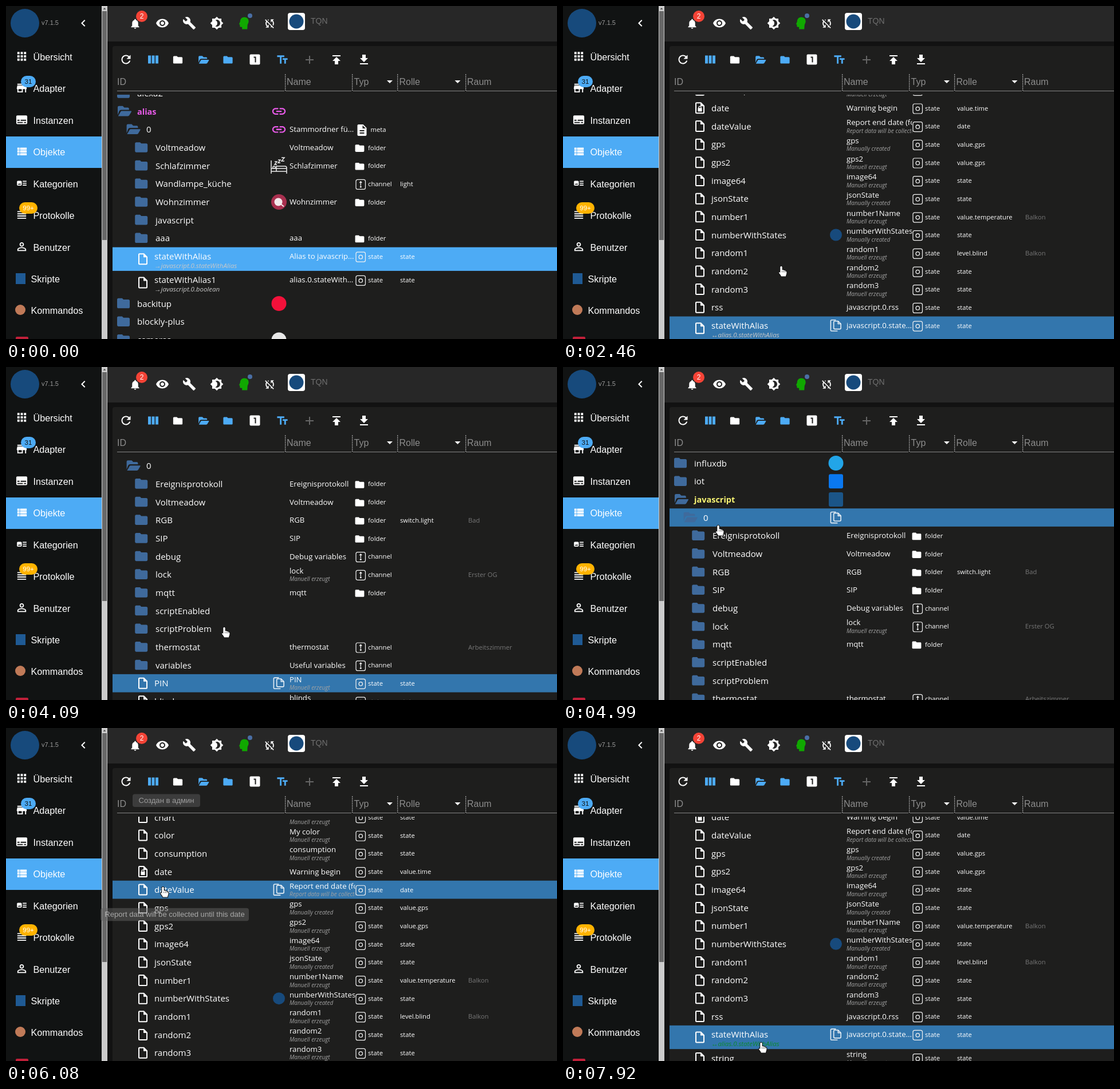
Recreate the animation shown at these times as an HTML page with a canvas. Size 962x582 px, loop 8000 ms.

```html
<!DOCTYPE html>
<html lang="de">
<head>
<meta charset="utf-8">
<style>
html, body { margin: 0; width: 100%; height: 100%; overflow: hidden; background: #121212; }
canvas { display: block; width: 962px; height: 582px; }
</style>
</head>
<body>
<canvas id="stage" width="962" height="582"></canvas>
<script>
const ctx = document.getElementById('stage').getContext('2d');
const LOOP = 8000, ROW = 31.67, TALL = 41.3, TOP = 155;
const UI = '"Liberation Sans", Arial, sans-serif';
const LIST = '"Open Sans", "Noto Sans", sans-serif';
const BLUE = '#4dabf5', HOVER = '#3376ad', FOLDER = '#3f6a9c', NAVY = '#174a7c', PANEL = '#1e1e1d';

const P = {};
const shapes = {
  apps: 'M4 4h4v4H4zM10 4h4v4h-4zM16 4h4v4h-4zM4 10h4v4H4zM10 10h4v4h-4zM16 10h4v4h-4zM4 16h4v4H4zM10 16h4v4h-4zM16 16h4v4h-4z',
  store: 'M20 4H4v2h16V4zm1 10v-2l-1-5H4l-1 5v2h1v6h10v-6h4v6h2v-6h1zm-9 4H6v-4h6v4z',
  subs: 'M20 4H4c-1.1 0-2 .9-2 2v12c0 1.1.9 2 2 2h16c1.1 0 2-.9 2-2V6c0-1.1-.9-2-2-2zM4 12h4v2H4v-2zm10 6H4v-2h10v2zm6 0h-4v-2h4v2zm0-4H10v-2h10v2z',
  list: 'M4 14h4v-4H4v4zm0 5h4v-4H4v4zM4 9h4V5H4v4zm5 5h12v-4H9v4zm0 5h12v-4H9v4zM9 5v4h12V5H9z',
  art: 'M22 13h-8v-2h8v2zm0-6h-8v2h8V7zm-8 10h8v-2h-8v2zm-2-8v6c0 1.1-.9 2-2 2H4c-1.1 0-2-.9-2-2V9c0-1.1.9-2 2-2h6c1.1 0 2 .9 2 2zm-1.5 6l-2.25-3-1.75 2.26-1.25-1.51L3.5 15h7z',
  lines: 'M4 15h16v-2H4v2zm0 4h16v-2H4v2zm0-8h16V9H4v2zm0-6v2h16V5H4z',
  person: 'M12 5.9a2.1 2.1 0 1 1 0 4.2 2.1 2.1 0 1 1 0-4.2m0 9c2.97 0 6.1 1.46 6.1 2.1v1.1H5.9V17c0-.64 3.13-2.1 6.1-2.1M12 4C9.79 4 8 5.79 8 8s1.79 4 4 4 4-1.79 4-4-1.79-4-4-4zm0 9c-2.67 0-8 1.34-8 4v3h16v-3c0-2.66-5.33-4-8-4z',
  bell: 'M12 22c1.1 0 2-.9 2-2h-4c0 1.1.89 2 2 2zm6-6v-5c0-3.07-1.64-5.64-4.5-6.32V4c0-.83-.67-1.5-1.5-1.5s-1.5.67-1.5 1.5v.68C7.63 5.36 6 7.92 6 11v5l-2 2v1h16v-1l-2-2z',
  eye: 'M12 4.5C7 4.5 2.73 7.61 1 12c1.73 4.39 6 7.5 11 7.5s9.27-3.11 11-7.5c-1.73-4.39-6-7.5-11-7.5zM12 17c-2.76 0-5-2.24-5-5s2.24-5 5-5 5 2.24 5 5-2.24 5-5 5zm0-8c-1.66 0-3 1.34-3 3s1.34 3 3 3 3-1.34 3-3-1.34-3-3-3z',
  wrench: 'M22.7 19l-9.1-9.1c.9-2.3.4-5-1.5-6.9-2-2-5-2.4-7.4-1.3L9 6 6 9 1.6 4.7C.4 7.1.9 10.1 2.9 12.1c1.9 1.9 4.6 2.4 6.9 1.5l9.1 9.1c.4.4 1 .4 1.4 0l2.3-2.3c.5-.4.5-1.1.1-1.4z',
  theme: 'M20 8.69V4h-4.69L12 .69 8.69 4H4v4.69L.69 12 4 15.31V20h4.69L12 23.31 15.31 20H20v-4.69L23.31 12 20 8.69zM12 18c-.89 0-1.74-.2-2.5-.55C11.56 16.5 13 14.42 13 12s-1.44-4.5-3.5-5.45C10.26 6.2 11.11 6 12 6c3.31 0 6 2.69 6 6s-2.69 6-6 6z',
  head: 'M13 1c5 0 8 3 8 7.500 0 3-1.500 4.500-2 6.500L18.500 23H9v-4H6.500Q4.500 19 5 16.500L5.200 14.500 3.500 14 5.500 9C5.500 4 9 1 13 1z',
  nosync: 'M10 6.35V4.26c-.8.21-1.55.54-2.23.96l1.46 1.46c.25-.12.5-.24.77-.33zm-7.14-.94l2.36 2.36C4.45 8.99 4 10.44 4 12c0 2.21.91 4.2 2.36 5.64L4 20h6v-6l-2.24 2.24C6.68 15.15 6 13.66 6 12c0-1 .25-1.94.68-2.77l8.08 8.08c-.25.13-.5.25-.77.34v2.09c.8-.21 1.55-.54 2.23-.96l2.36 2.36 1.27-1.27L4.14 4.14 2.86 5.41zM20 4h-6v6l2.24-2.24C17.32 8.85 18 10.34 18 12c0 1-.25 1.94-.68 2.77l1.46 1.46C19.55 15.01 20 13.56 20 12c0-2.21-.91-4.2-2.36-5.64L20 4z',
  refresh: 'M17.65 6.35C16.2 4.9 14.21 4 12 4c-4.42 0-7.99 3.58-7.99 8s3.57 8 7.99 8c3.73 0 6.84-2.55 7.73-6h-2.08c-.82 2.33-3.04 4-5.65 4-3.31 0-6-2.69-6-6s2.69-6 6-6c1.66 0 3.14.69 4.22 1.78L13 11h7V4l-2.35 2.35z',
  cols: 'M3 5h5v14H3zM9.500 5h5v14h-5zM16 5h5v14h-5z',
  folder: 'M10 4H4c-1.1 0-1.99.9-1.99 2L2 18c0 1.1.9 2 2 2h16c1.1 0 2-.9 2-2V8c0-1.1-.9-2-2-2h-8l-2-2z',
  open: 'M2 18V6q0-2 2-2h6l2.500 2.500H18q2 0 2 2V10H7.500q-2 0-3 1.800zM2.700 20l4-7q.6-1 2-1H23q1.400 0 .7 1.300l-3.400 5.700q-.6 1-2 1z',
  one: 'M19 3H5c-1.1 0-2 .9-2 2v14c0 1.1.9 2 2 2h14c1.1 0 2-.9 2-2V5c0-1.1-.9-2-2-2zm-5 14h-2V9h-2V7h4v10z',
  text: 'M2.5 4v3h5v12h3V7h5V4h-13zm19 5h-9v3h3v7h3v-7h3V9z',
  add: 'M19 13h-6v6h-2v-6H5v-2h6V5h2v6h6v2z',
  up: 'M5 4v2h14V4H5zm0 10h4v6h6v-6h4l-7-7-7 7z',
  down: 'M19 9h-4V3H9v6H5l7 7 7-7zM5 18v2h14v-2H5z',
  file: 'M14 2H6c-1.1 0-2 .9-2 2v16c0 1.1.89 2 1.99 2H18c1.1 0 2-.9 2-2V8l-6-6zM6 20V4h7v5h5v11H6z',
  meta: 'M14 2H6c-1.1 0-1.99.9-1.99 2L4 20c0 1.1.89 2 1.99 2H18c1.1 0 2-.9 2-2V8l-6-6zm2 16H8v-2h8v2zm0-4H8v-2h8v2zm-3-5V3.5L18.5 9H13z',
  link: 'M3.9 12c0-1.71 1.39-3.1 3.1-3.1h4V7H7c-2.76 0-5 2.24-5 5s2.24 5 5 5h4v-1.900H7c-1.71 0-3.100-1.390-3.100-3.100zM8 13h8v-2H8v2zm9-6h-4v1.900h4c1.710 0 3.100 1.390 3.100 3.100s-1.390 3.100-3.100 3.100h-4V17h4c2.760 0 5-2.240 5-5s-2.240-5-5-5z',
  chevron: 'M15.41 7.41L14 6l-6 6 6 6 1.41-1.41L10.83 12z',
  drop: 'M7 10l5 5 5-5z',
  hand: 'M-1.700 1Q0-1.500 1.700 1V6.500Q4 5.500 5 7.300Q7.300 6.700 8 8.500Q9.500 8.500 9.500 11L9 14Q8 15.500 8 17.500H0Q-1 15-4 11.500Q-4.500 9.500-1.700 10.700Z',
  copy: 'M2.500 17V4.500q0-2 2-2H12M8 6.500q0-2 2-2h6l5 5V17q0 2-2 2h-9q-2 0-2-2zM16 4.500v5h5M2.500 17v4q0 1.500 1.500 1.500h11',
  bed: 'M0 4v23M0 23h27v4M27 23v-6q0-3-3-3H9v9M0 18h27M7 16a2 2 0 1 1-4 0a2 2 0 1 1 4 0M6 6h4l-4 5h4M12 3h4l-4 5h4M18-1h5l-5 6h5'
};
for (const k in shapes) P[k] = new Path2D(shapes[k]);

// name | kind | title | subtitle | type | role | room | icon | link
const parse = s => {
  let y = 0;
  return s.trim().split('\n').map(line => {
    const [name, kind, title, sub, type, role, room, icon, link] = line.split('|');
    const row = { name, kind, title, sub, type, role, room, icon, link, y, h: link ? TALL : ROW };
    y += row.h;
    return row;
  });
};
const aliasRows = parse(`
alexa2|a
alias|A|||||| link
0|B|Stammordner fü...||meta|||link
Voltmeadow|c|Voltmeadow||folder
Schlafzimmer|c|Schlafzimmer||folder|||bed
Wandlampe_küche|c|||channel|light
Wohnzimmer|c|Wohnzimmer||folder|||room
javascript|c
aaa|c|aaa||folder
stateWithAlias|f|Alias to javascrip...||state|state|||→javascript.0.stateWithAlias
stateWithAlias1|f|alias.0.stateWith...||state|state|||→javascript.0.boolean
backitup|a||||||#f3113a
blockly-plus|a
cameras|a||||||#e8e8e8`);
const scriptRows = parse(`
influxdb|a||||||#22a5e8
iot|a||||||sq#0a78f0
javascript|A||||||sq#1b5588
0|B
Ereignisprotokoll|c|Ereignisprotokoll||folder
Voltmeadow|c|Voltmeadow||folder
RGB|c|RGB||folder|switch.light|Bad
SIP|c|SIP||folder
debug|c|Debug variables||channel
lock|c|lock|Manuell erzeugt|channel||Erster OG
mqtt|c|mqtt||folder
scriptEnabled|c
scriptProblem|c
thermostat|c|thermostat||channel||Arbeitszimmer
variables|c|Useful variables||channel
PIN|f|PIN|Manuell erzeugt|state|state
blinds|f|blinds|Создан в админ|state|state
boolean|f|My Boolean|Manuell erzeugt|state|button|||3 Links von Aliasen
chart|f|chart|Manuell erzeugt|state|state
color|f|My color|Manuell erzeugt|state|state
consumption|f|consumption|Manuell erzeugt|state|state
date|l|Warning begin||state|value.time
dateValue|f|Report end date (for|Report data will be collected|state|date
gps|f|gps|Manually created|state|value.gps
gps2|f|gps2|Manuell erzeugt|state|value.gps
image64|f|image64|Manuell erzeugt|state|state
jsonState|f|jsonState|Manually created|state|state
number1|f|number1Name|Manuell erzeugt|state|value.temperature|Balkon
numberWithStates|f|numberWithStates|Manually created|state|state||${NAVY}
random1|f|random1|Manuell erzeugt|state|level.blind|Balkon
random2|f|random2|Manuell erzeugt|state|state
random3|f|random3|Manuell erzeugt|state|state
rss|f|javascript.0.rss||state|state
stateWithAlias|f|javascript.0.state...||state|state|||↔alias.0.stateWithAlias
string|f|string|Manuell erzeugt|state|state
switch|f|switch|Manuell erzeugt|state|state
text|f|text|Manuell erzeugt|state|state`);

// Keyframes: time, values
const scrollKeys = [[0, -608], [2260, -608], [2460, -512.5], [2600, -469], [2730, -469], [3290, -95.2], [3430, -40.7],
  [3890, -40.7], [4160, 97], [4290, 97], [4640, 152.2], [5060, 152.2], [5480, -260], [5880, -397], [5950, -405],
  [6080, -439], [6240, -534.9]];
const pointerKeys = [[190, 398, 545], [670, 380, 457], [850, 380, 457], [860, 379, 456], [1040, 379, 456], [1130, 376, 447],
  [1190, 380, 455], [1640, 380, 455], [1730, 381, 455], [4640, 381, 455], [4980, 271, 277], [5950, 272, 277],
  [6080, 274, 278], [6280, 274, 278], [6780, 315, 494], [7390, 343, 546], [7730, 343, 546], [7920, 346, 550]];
// Hovered row from a time on; null follows the pointer
const hoverKeys = [[0, -1], [190, null], [2260, 33], [3760, null], [3890, 15], [4160, null], [4290, 11], [4640, null],
  [5060, 3], [5480, 16], [6010, 22], [6280, null]];

function tween(keys, t, i = 1) {
  const n = keys.findIndex(k => k[0] > t);
  if (n < 0) return keys[keys.length - 1][i];
  if (!n) return keys[0][i];
  const a = keys[n - 1], b = keys[n];
  return a[i] + (b[i] - a[i]) * (t - a[0]) / (b[0] - a[0]);
}
const hoverAt = t => hoverKeys.filter(k => k[0] <= t).pop()[1];

function label(s, x, y, size, color = '#fff', font = LIST, style = '') {
  ctx.font = `${style} ${size}px ${font}`;
  ctx.fillStyle = color;
  ctx.fillText(s, x, y);
}
function mid(s, x, y, size, color) {
  ctx.textAlign = 'center';
  label(s, x, y, size, color, UI);
  ctx.textAlign = 'left';
}
function icon(name, x, y, size = 24, color = '#fff', stroke = 0) {
  ctx.save();
  ctx.translate(x, y);
  ctx.scale(size / 24, size / 24);
  ctx.translate(-12, -12);
  paint(name, color, stroke);
  ctx.restore();
}
function paint(name, color, stroke) {
  if (stroke) {
    ctx.strokeStyle = color;
    ctx.lineWidth = stroke;
    ctx.stroke(P[name]);
  } else {
    ctx.fillStyle = color;
    ctx.fill(P[name]);
  }
}
function rect(x, y, w, h, color) {
  ctx.fillStyle = color;
  ctx.fillRect(x, y, w, h);
}
function round(x, y, w, h, r, color, line) {
  ctx.beginPath();
  ctx.roundRect(x, y, w, h, r);
  if (line) {
    ctx.strokeStyle = color;
    ctx.lineWidth = line;
    ctx.stroke();
  } else {
    ctx.fillStyle = color;
    ctx.fill();
  }
}
function disc(x, y, r, color) {
  ctx.beginPath();
  ctx.arc(x, y, r, 0, 7);
  ctx.fillStyle = color;
  ctx.fill();
}

function sidebar() {
  rect(0, 0, 167, 582, '#111313');
  rect(0, 228, 167, 55, BLUE);
  disc(33, 30, 25, NAVY);
  label('v7.1.5', 62, 33, 11, '#9a9a9a', UI);
  icon('chevron', 135, 30, 24);
  const items = [['Übersicht', 'apps'], ['Adapter', 'store'], ['Instanzen', 'subs'], ['Objekte', 'list'], ['Kategorien', 'art'],
    ['Protokolle', 'lines'], ['Benutzer', 'person'], ['Skripte'], ['Kommandos']];
  items.forEach(([name, pic], i) => {
    const y = 89 + i * 55.43;
    if (pic) icon(pic, 27.5, y - 1, pic === 'art' ? 20 : 23);
    label(name, pic ? 47.500 : 43.5, y + 6, 16.2, '#fff', UI);
  });
  rect(17, 467, 17, 19, '#1f5a94');
  disc(25, 531, 9, '#c07a58');
  round(17, 578, 22, 10, 2, '#c0203a');
  round(26, 122, 26, 20, 10, BLUE);
  mid('31', 39, 136, 11.5, '#111');
  round(23, 343, 32, 20, 10, '#ffb300');
  mid('99+', 39, 357, 11.5, '#fff');
  rect(167, 0, 10, 582, '#cbcbcb');
  rect(168, 9, 8, 400, '#696969');
  ctx.beginPath();
  ctx.moveTo(169.5, 6); ctx.lineTo(172, 3); ctx.lineTo(174.5, 6);
  ctx.fillStyle = '#505050';
  ctx.fill();
}

function topBars() {
  rect(177, 0, 785, 62, '#272727');
  icon('bell', 225.5, 31, 21);
  disc(237, 18, 10, '#f44336');
  mid('2', 237, 22, 12, '#fff');
  icon('eye', 273, 30);
  icon('wrench', 320, 30);
  icon('theme', 368, 30);
  icon('head', 415, 30, 23, '#10a800');
  disc(426, 17, 4, '#4a6fa5');
  icon('nosync', 460.5, 30.5, 22);
  round(492, 12, 30, 30, 4, '#fff');
  disc(507, 27, 12.5, NAVY);
  label('TQN', 532, 31, 14, '#707070', UI);

  icon('refresh', 209.5, 93.5);
  icon('cols', 257, 93.5, 24, BLUE);
  icon('folder', 300, 94, 19.5);
  icon('open', 344.5, 94, 20, BLUE);
  icon('folder', 387.500, 94, 19.5, BLUE);
  icon('one', 434.5, 93.5);
  icon('text', 482.5, 94, 23, BLUE);
  icon('add', 530, 94, 24, '#666');
  icon('up', 577, 94);
  icon('down', 625, 94);

  const heads = [['ID', 194, 486], ['Name', 490, 603], ['Typ', 607.5, 682], ['Rolle', 686.5, 801], ['Raum', 805, 962]];
  heads.forEach(([s, x, end], i) => {
    label(s, x, 137.500, 16, '#8d8d8d', UI);
    rect(i ? x - 2 : x, 148, end - x + (i ? 2 : 0), 1, '#858585');
    if (i < 4) for (let y = 119; y < 149; y += 3) rect(end + 1, y, 1.3, 2, '#a0a0a0');
  });
  icon('drop', 670, 132);
  icon('drop', 788.5, 132);
}

function rowIcon(name, y) {
  name = name.trim();
  if (name === 'link') icon('link', 476.5, y, 28, '#e85ae8');
  else if (name === 'bed') {
    ctx.save();
    ctx.translate(463, y - 13);
    paint('bed', '#eee', 1.5);
    ctx.restore();
  } else if (name === 'room') {
    disc(476.500, y, 13.500, '#a8304f');
    disc(475.5, y, 7, '#f3e9ec');
    ctx.beginPath();
    ctx.moveTo(479, y + 3); ctx.lineTo(485, y + 8);
    ctx.strokeStyle = '#f3e9ec';
    ctx.lineWidth = 2;
    ctx.stroke();
  } else if (name.startsWith('sq')) round(464, y - 12.5, 25, 25, 3, name.slice(2));
  else disc(476.500, y, name === NAVY ? 10.5 : 13, name);
}

function typeIcon(type, y) {
  if (type === 'folder') return icon('folder', 617.5, y, 19);
  if (type === 'meta') return icon('meta', 621.500, y, 24);
  round(611, y - 8.5, 16.500, 17, 3, '#f2f2f2', 1.2);
  ctx.beginPath();
  if (type === 'state') ctx.arc(619.3, y, 3.2, 0, 7);
  else {
    ctx.moveTo(619.3, y - 5); ctx.lineTo(619.3, y + 2);
    ctx.moveTo(617.3, y - 3); ctx.lineTo(619.3, y - 5.3); ctx.lineTo(621.3, y - 3);
  }
  ctx.lineWidth = 1.3;
  ctx.stroke();
  if (type === 'channel') disc(619.3, y + 4, 1.5, '#f2f2f2');
}

function drawRow(r, y, hover, selected, green) {
  if (hover || selected) rect(186, y, 776, r.h, hover ? HOVER : BLUE);
  const c = y + ROW / 2, level = { a: 0, A: 0, B: 1 }[r.kind] ?? 2;
  const isFile = r.kind === 'f' || r.kind === 'l', isOpen = r.kind === 'A' || r.kind === 'B';
  if (isFile) {
    const m = y + r.h / 2;
    icon('file', 239, m);
    if (r.kind === 'l') {
      rect(235.5, m, 7, 6, '#fff');
      round(237, m - 3, 4, 5, 2, '#fff', 1.3);
    }
  } else icon(isOpen ? 'open' : 'folder', (isOpen ? 206 : 205) + level * 15.600, c - 0.5, 26.4, FOLDER);
  const color = r.kind === 'A' ? (r.name === 'alias' ? '#e85ae8' : '#f9f573') : '#fff';
  label(r.name, isFile ? 259 : 229 + level * 16, y + 21.5, r.kind === 'A' ? 14.5 : 15, color, LIST, r.kind === 'A' ? 'bold' : '');
  if (r.link) label(r.link, 259, y + 36, 11.5, green ? '#0b8a2c' : '#c8c8c8', LIST, 'italic');
  if (r.icon) rowIcon(r.icon, c);
  else if (hover) icon('copy', 476.500, c - 0.5, 23, '#e6eef5', 1.7);
  if (r.title) {
    ctx.save();
    ctx.beginPath();
    ctx.rect(490, y - 2, 119.5, r.h + 4);
    ctx.clip();
    label(r.title, 495, y + (r.sub ? 14 : 20.500), 13.2);
    if (r.sub) label(r.sub, 495, y + 27.5, 10, '#a2a2a2', LIST, 'italic');
    ctx.restore();
  }
  if (r.type) {
    typeIcon(r.type, y + 17);
    label(r.type, r.type === 'meta' ? 636.500 : 632, y + 20, 11.3);
  }
  if (r.role) label(r.role, 688, y + 20, 11.2);
  if (r.room) label(r.room, 807, y + 20, 11.2, '#777');
}

function tip(s, x, y, w, alpha) {
  if (alpha <= 0) return;
  ctx.globalAlpha = alpha;
  round(x, y, w, 22.5, 4, 'rgba(97,97,97,.92)');
  mid(s, x + w / 2, y + 15.5, 13.1, '#fff');
  ctx.globalAlpha = 1;
}

function draw(t) {
  const before = t < 1330;
  const rows = before ? aliasRows : scriptRows;
  const off = before ? 136.600 : tween(scrollKeys, t);
  const px = tween(pointerKeys, t), py = tween(pointerKeys, t, 2);
  let hover = hoverAt(t);
  if (hover === null) hover = rows.findIndex(r => py >= r.y + off && py < r.y + off + r.h);
  const chosen = before ? 9 : 33;

  rect(0, 0, 962, 582, '#121212');
  round(186, 70, 790, 530, 4, PANEL);
  ctx.save();
  ctx.beginPath();
  ctx.rect(186, TOP, 776, 582 - TOP);
  ctx.clip();
  rows.forEach((r, i) => {
    const y = r.y + off;
    if (y > 590 || y + r.h < TOP - 5) return;
    const onLink = t >= 190 && r.link && i === hover && px < 404 && py > y + 25 && py < y + 41;
    drawRow(r, y, i === hover, i === chosen, onLink);
  });
  ctx.restore();
  topBars();
  sidebar();

  const blinds = tween([[5900, 0], [6080, 0.5], [6240, 0]], t);
  const until = tween([[6000, 0], [6080, 0.55], [6160, 0.6], [6400, 0]], t);
  tip('Создан в админ', 221, scriptRows[16].y + off + 48.5, 118, blinds);
  tip('Report data will be collected until this date', 165, scriptRows[22].y + off + 48, 259, until);

  if (t >= 190) {
    ctx.save();
    ctx.translate(px, py);
    paint('hand', '#111', 2);
    paint('hand', '#fff');
    ctx.beginPath();
    for (const x of [1.700, 4.500, 7]) { ctx.moveTo(x, 8); ctx.lineTo(x, 10.500); }
    ctx.strokeStyle = '#333';
    ctx.lineWidth = 0.8;
    ctx.stroke();
    ctx.restore();
  }
}

const start = performance.now();
function frame() {
  draw((performance.now() - start) % LOOP);
  requestAnimationFrame(frame);
}
draw(0);
requestAnimationFrame(frame);
</script>
</body>
</html>
```
